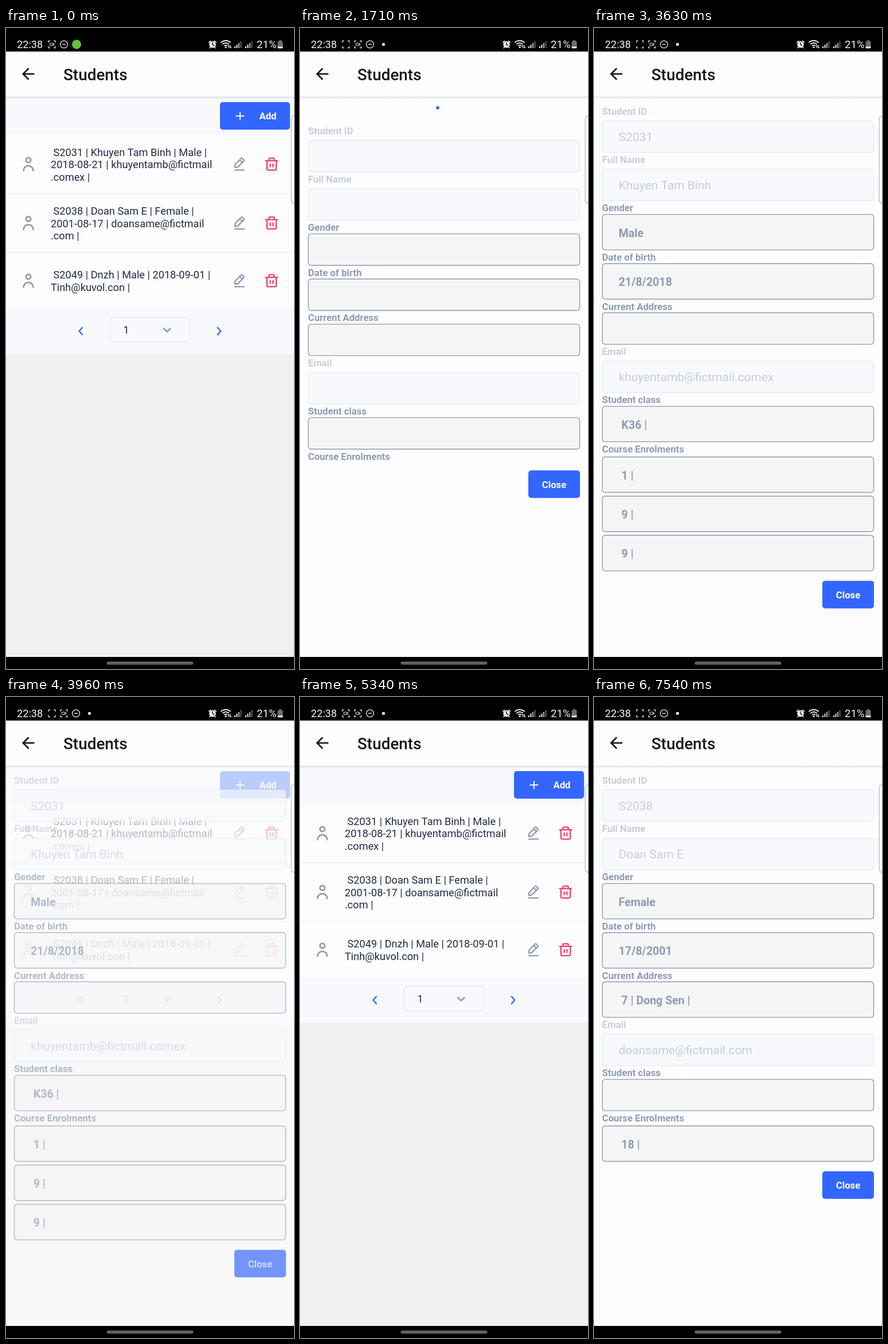
An HTML page with a canvas for the animation above (8000 ms loop, 502 px wide and 1116 px high).

```html
<!DOCTYPE html>
<html lang="en">
<head>
<meta charset="utf-8">
<title>Students</title>
<style>
html, body { margin: 0; width: 100%; height: 100%; overflow: hidden; background: #000; }
canvas { display: block; width: 502px; height: 1116px; }
</style>
</head>
<body>
<canvas id="stage"></canvas>
<script>
const W = 502, H = 1116, LOOP = 8000;
const canvas = document.getElementById('stage');
const ctx = canvas.getContext('2d');
const dpr = window.devicePixelRatio || 1;
canvas.width = W * dpr;
canvas.height = H * dpr;

const BLUE = '#3366ff', INK = '#222b45', HINT = '#8f9bb3', PINK = '#f73b70';
const PAGE = '#fdfdfd', BAND = '#f7f9fd', GREY = '#f0f0f0', FADED = '#c8cdd8';

const ICONS = {
  person: 'M15 7a3 3 0 1 1-6 0a3 3 0 1 1 6 0M6 20a6 6 0 0 1 12 0',
  edit: 'M5 21h14M5 17l.45-4.2a1 1 0 0 1 .28-.6l9-9q.6-.5 1.2 0l2.7 2.7q.6.6 0 1.3l-9 9-.7.3zM12.3 5.6l4.1 4.1',
  trash: 'M3 7h18M5 7v12a2 2 0 0 0 2 2h10a2 2 0 0 0 2-2V7M8 7V4.3A1.3 1.3 0 0 1 9.3 3h5.4A1.3 1.3 0 0 1 16 4.3V7M10 12v4M14 12v4'
};
for (const k in ICONS) ICONS[k] = new Path2D(ICONS[k]);

const students = [
  { mid: 237, lines: [' S2031 | Khuyen Tam Binh | Male |', '2018-08-21 | khuyentamb@fictmail', '.comex |'] },
  { mid: 339.5, lines: [' S2038 | Doan Sam E | Female |', '2001-08-17 | doansame@fictmail', '.com |'] },
  { mid: 440, lines: [' S2049 | Dnzh | Male | 2018-09-01 |', 'Tinh@kuvol.con |'] }
];

const blank = { courses: [] };
const first = {
  id: 'S2031', name: 'Khuyen Tam Binh', gender: 'Male', birth: '21/8/2018',
  mail: 'khuyentamb@fictmail.comex', group: ' K36 |', courses: [' 1 |', ' 9 |', ' 9 |']
};
const second = {
  id: 'S2038', name: 'Doan Sam E', gender: 'Female', birth: '17/8/2001',
  address: ' 7 | Dong Sen |', mail: 'doansame@fictmail.com', courses: [' 18 |']
};

// Form visits: fade in, data arrives, fade out
const visits = [
  { open: 1470, ready: 1950, close: 3900, data: first },
  { open: 5400, ready: 5700, close: Infinity, data: second }
];

const clamp = v => Math.max(0, Math.min(1, v));
const ease = v => { v = clamp(v); return v * v * (3 - 2 * v); };

function rect(x, y, w, h, color) {
  ctx.fillStyle = color;
  ctx.fillRect(x, y, w, h);
}

function box(x, y, w, h, r, fill, stroke, lw = 1.3) {
  ctx.beginPath();
  ctx.roundRect(x, y, w, h, r);
  if (fill) { ctx.fillStyle = fill; ctx.fill(); }
  if (stroke) { ctx.strokeStyle = stroke; ctx.lineWidth = lw; ctx.stroke(); }
}

function disc(x, y, r, color) {
  ctx.fillStyle = color;
  ctx.beginPath();
  ctx.arc(x, y, r, 0, Math.PI * 2);
  ctx.fill();
}

function text(s, x, y, size, color, weight = 400, align = 'left') {
  ctx.font = `${weight} ${size}px Roboto, sans-serif`;
  ctx.textAlign = align;
  ctx.fillStyle = color;
  ctx.fillText(s, x, y);
}

function line(points, color, lw, cap = 'round') {
  ctx.beginPath();
  for (let i = 0; i < points.length; i += 2) ctx.lineTo(points[i], points[i + 1]);
  ctx.strokeStyle = color;
  ctx.lineWidth = lw;
  ctx.lineCap = ctx.lineJoin = cap === 'round' ? 'round' : 'miter';
  ctx.lineCap = cap;
  ctx.stroke();
}

function arc(x, y, r, a, b, color, lw, cap = 'butt') {
  ctx.beginPath();
  ctx.arc(x, y, r, a, b);
  ctx.strokeStyle = color;
  ctx.lineWidth = lw;
  ctx.lineCap = cap;
  ctx.stroke();
}

function icon(name, x, y, scale, color) {
  ctx.save();
  ctx.translate(x, y);
  ctx.scale(scale, scale);
  ctx.translate(-12, -12);
  ctx.strokeStyle = color;
  ctx.lineWidth = 2;
  ctx.lineCap = ctx.lineJoin = 'round';
  ctx.stroke(ICONS[name]);
  ctx.restore();
}

function recorder(x, filled) {
  const y = 28.5, w = 6, h = 6, n = 3;
  for (const sx of [-1, 1]) for (const sy of [-1, 1])
    line([x + sx * (w - n), y + sy * h, x + sx * w, y + sy * h, x + sx * w, y + sy * (h - n)], '#d8d8d8', 1.3, 'butt');
  if (filled) {
    box(x - 3.5, y - 2.2, 5, 4.4, 1, null, '#d8d8d8', 1.1);
    line([x + 1.8, y, x + 3.6, y - 1.8, x + 3.6, y + 1.8, x + 1.8, y], '#d8d8d8', 1, 'butt');
  }
}

function signal(x) {
  for (let i = 0; i < 4; i++)
    rect(x + i * 3.5, 32 - i * 3, 2, 3 + i * 3, i < 2 ? '#f0f0f0' : i < 3 ? '#b5b5b5' : '#666');
}

function statusBar(t) {
  rect(0, 0, W, 41, '#000');
  text('22:38', 19, 34.6, 18.2, '#f4f4f4');

  // A new indicator slides in and pushes the others right
  const p = ease((t - 60) / 380), shift = 21 * p;
  const filled = t < 1210 || (t >= 5010 && t < 5730);
  ctx.globalAlpha = p;
  recorder(80, filled);
  ctx.globalAlpha = 1;
  recorder(80 + shift, true);
  arc(101 + shift, 28.5, 6.4, 0, Math.PI * 2, '#e4e4e4', 1.4);
  line([98 + shift, 28.5, 104 + shift, 28.5], '#e4e4e4', 1.5, 'butt');
  ctx.globalAlpha = 1 - p;
  disc(123 + shift, 28.5, 8 - 5 * p, '#62c43c');
  ctx.globalAlpha = p;
  disc(145.5, 28.5, 2.6, '#f4f4f4');
  ctx.globalAlpha = 1;

  // Alarm
  disc(360, 28.8, 5.8, '#eee');
  line([360, 25.5, 360, 29, 362.6, 30.6], '#000', 1.3);
  line([353.8, 25, 356.6, 22.6], '#eee', 1.7);
  line([363.4, 22.6, 366.2, 25], '#eee', 1.7);
  line([356, 33.5, 355, 34.8], '#eee', 1.5);
  line([364, 33.5, 365, 34.8], '#eee', 1.5);

  // Wi-Fi
  for (const r of [4, 8, 12]) arc(383, 34, r, -Math.PI * 0.75, -Math.PI * 0.25, '#eee', 1.8);
  disc(383, 33.6, 1.6, '#eee');
  line([388.4, 35, 388.4, 30], '#eee', 1.2, 'butt');
  line([391.4, 30, 391.4, 35], '#eee', 1.2, 'butt');
  line([386.8, 31.8, 388.4, 29.8, 390, 31.8], '#eee', 1, 'butt');
  line([389.8, 33.2, 391.4, 35.2, 393, 33.2], '#eee', 1, 'butt');

  signal(398);
  signal(417);
  text('21%', 437, 34.6, 18.6, '#f4f4f4');
  rect(475.8, 21.4, 4.4, 2, '#777');
  box(473.4, 23, 9.2, 12.6, 1.6, '#6d6d6d');
  rect(473.6, 32.4, 8.8, 2.8, '#eee');
}

function header() {
  rect(0, 41, W, 79, PAGE);
  const g = ctx.createLinearGradient(0, 119, 0, 124);
  g.addColorStop(0, 'rgba(0,0,0,.13)');
  g.addColorStop(1, 'rgba(0,0,0,0)');
  ctx.fillStyle = g;
  ctx.fillRect(0, 119.5, W, 4.5);
  line([49.5, 80, 30, 80], '#18181c', 2.7, 'butt');
  line([39.6, 70.2, 29.8, 80, 39.6, 89.8], '#18181c', 2.7, 'butt');
  text('Students', 100, 90.5, 27.9, '#18181c', 500);
}

function edgeHandle() {
  box(497.2, 153.2, 20, 152, 5, 'rgba(253,253,255,.8)', '#b3b6c6', 1.2);
}

function navBar() {
  rect(0, 1095, W, 21, '#000');
  box(175.5, 1103, 151, 5.4, 2.7, '#626262');
}

function listPage() {
  rect(0, 120, W, 448, BAND);
  rect(0, 567.5, W, 528, GREY);
  rect(0, 186, W, 302.5, PAGE);
  rect(0, 288, W, 1.2, '#e6eaf3');
  rect(0, 390, W, 1.2, '#e6eaf3');

  box(373, 129, 122, 48, 5, BLUE);
  line([401.5, 153.2, 414.5, 153.2], '#fff', 1.9);
  line([408, 146.7, 408, 159.7], '#fff', 1.9);
  text('Add', 456.5, 159.3, 16.7, '#fff', 700, 'center');

  for (const s of students) {
    icon('person', 39, s.mid, 1.394, HINT);
    const top = s.mid + 7 - (s.lines.length - 1) * 10.75;
    s.lines.forEach((l, i) => text(l, 78, top + i * 21.5, 18.2, INK));
    icon('edit', 407, s.mid, 1.16, HINT);
    icon('trash', 463, s.mid, 1.16, PINK);
  }

  line([133, 521.5, 127.6, 527.7, 133, 534], BLUE, 2.4);
  line([368.8, 521.5, 374.2, 527.7, 368.8, 534], BLUE, 2.4);
  box(182, 503.5, 138.5, 43.5, 5, BAND, '#e4e9f2', 1.4);
  text('1', 204.5, 532.3, 18.2, INK);
  line([275, 523.2, 280.7, 528.7, 286.4, 523.2], HINT, 2.7);
}

function openField(y, value, height) {
  box(14.5, y, 473, height, 5, '#f5f5f6', HINT, 1.4);
  if (value) text(value, 43, y + height / 2 + 8, 19.5, HINT, 700);
}

function spinner(t, start) {
  const u = (t - start - 240) / 1000;
  const sweep = 0.4 + 3.6 * Math.sin(Math.PI * u) ** 2;
  const from = Math.PI * 1.2 - 0.2 + u * Math.PI * 2;
  arc(251, 147, 13.6, from, from + sweep, BLUE, 5);
}

function formPage(data, t, start) {
  rect(0, 120, W, 975, PAGE);
  let y = 145;
  if (data === blank) {
    spinner(t, start);
    y += 33.8;
  }

  const label = (s, color) => text(s, 14, y + 6, 16.7, color, 700);
  const locked = (name, value) => {
    label(name, FADED);
    box(14.5, y + 16.7, 473, 55, 5, BAND, '#e4e9f2', 1.3);
    if (value) text(value, 43, y + 52, 20.9, FADED);
    y += 84.2;
  };
  const open = (name, value) => {
    const h = value ? 61.8 : 54.8;
    label(name, HINT);
    openField(y + 11.2, value, h);
    y += h + 23.8;
  };

  locked('Student ID', data.id);
  locked('Full Name', data.name);
  open('Gender', data.gender);
  open('Date of birth', data.birth);
  open('Current Address', data.address);
  locked('Email', data.mail);
  open('Student class', data.group);
  label('Course Enrolments', HINT);
  for (const c of data.courses) {
    openField(y + 13.7, c, 61.8);
    y += 68.3;
  }
  box(398, y + 24.5, 90, 48, 5, BLUE);
  text('Close', 443, y + 55, 16.7, '#fff', 700, 'center');
}

function draw(t) {
  ctx.setTransform(dpr, 0, 0, dpr, 0, 0);
  ctx.globalAlpha = 1;
  listPage();
  for (const v of visits) {
    const alpha = ease((t - v.open) / 160) * (1 - ease((t - v.close) / 160));
    if (alpha <= 0) continue;
    ctx.globalAlpha = alpha;
    formPage(t < v.ready ? blank : v.data, t, v.open);
    ctx.globalAlpha = 1;
  }
  header();
  edgeHandle();
  statusBar(t);
  navBar();
}

const begin = performance.now();
function tick() {
  draw((performance.now() - begin) % LOOP);
  requestAnimationFrame(tick);
}
tick();
</script>
</body>
</html>
```
